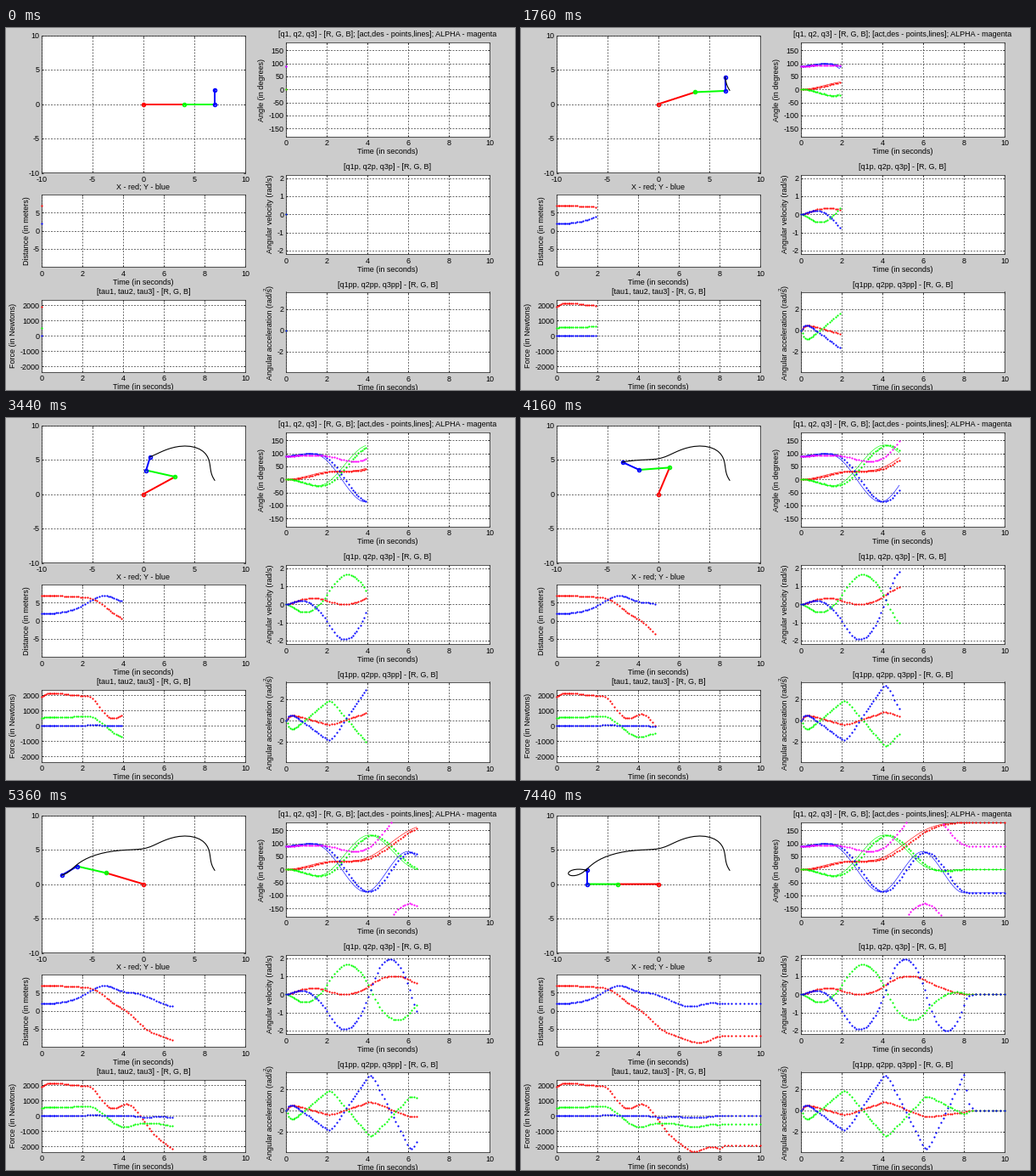
A matplotlib script for the animation above (7.52 s loop, 600x426 px).

```python
import numpy as np
import matplotlib.pyplot as plt
from matplotlib.animation import FuncAnimation

W, H, DPI = 600, 426, 100
PX = 72 / DPI  # points per pixel
plt.rcParams.update({"font.family": "Liberation Sans", "font.size": 9 * PX,
                     "lines.scale_dashes": False})
RED, GREEN, BLUE, MAGENTA = "#ff0000", "#00ff00", "#0000ff", "#ff00ff"
RGB = (RED, GREEN, BLUE)

# Arm of three uniform rods, steered through joint angles given every two seconds
LENGTHS = np.array([4, 3, 2])
MASSES = 5.05 * LENGTHS
GRAVITY = 9.81
VIA_STEP = 2
VIA_ANGLES = np.radians([[0, 29, 45, 147, 180], [0, -14, 131, 15, 0], [90, 73, -86, 68, -90]])
LAG = 0.085  # time constant of each of the controller's two delay stages
DT = 0.001
clock = np.arange(0, 10 + DT / 2, DT)


def spline_acceleration(q):
    """Acceleration at the via points of a cubic spline that starts and ends at rest."""
    n, h = len(q) - 2, VIA_STEP
    system = 4 * np.eye(n) + np.eye(n, k=1) + np.eye(n, k=-1)
    v = np.pad(np.linalg.solve(system, 3 * (q[2:] - q[:-2]) / h), 1)
    rise = 6 * np.diff(q) / h ** 2
    return np.append(rise - (4 * v[:-1] + 2 * v[1:]) / h, 2 * v[-2] / h - rise[-1])


def integrate(rate, start=0):
    return start + np.append(0, np.cumsum(rate[1:] + rate[:-1]) * DT / 2)


def delayed(signal):
    t = clock[clock < 1]
    kernel = t * np.exp(-t / LAG)
    return np.convolve(signal, kernel / kernel.sum())[:len(signal)]


via_times = VIA_STEP * np.arange(VIA_ANGLES.shape[1])
wanted_acc = [np.interp(clock, via_times, spline_acceleration(q), right=0) for q in VIA_ANGLES]
wanted = np.array([integrate(integrate(a), q[0]) for a, q in zip(wanted_acc, VIA_ANGLES)])
acc = np.array([delayed(a) for a in wanted_acc])
vel = np.array([integrate(a) for a in acc])
angle = np.array([integrate(v, q[0]) for v, q in zip(vel, VIA_ANGLES)])

# The solver's step size varies, so the samples are unevenly spaced
samples = np.interp(np.arange(89), [0, 10, 22, 33, 41, 77, 80, 88],
                    [0, .71, 1.9, 3.2, 3.92, 8, 8.4, 10])
index = np.rint(samples / DT).astype(int)
times = clock[index]
wanted, acc, vel, angle = (rows[:, index] for rows in (wanted, acc, vel, angle))
alpha = (np.degrees(angle.sum(axis=0)) + 180) % 360 - 180

# Complex numbers hold plane positions and accelerations
direction = np.exp(1j * np.cumsum(angle, axis=0))
spin, spin_rate = np.cumsum(vel, axis=0), np.cumsum(acc, axis=0)
rods = LENGTHS[:, None] * direction
rod_acc = rods * (1j * spin_rate - spin ** 2)
joints = np.vstack([0 * times, np.cumsum(rods, axis=0)])
joint_acc = np.vstack([0 * times, np.cumsum(rod_acc, axis=0)])
centers = joints[:-1] + rods / 2
forces = MASSES[:, None] * (joint_acc[:-1] + rod_acc / 2 + 1j * GRAVITY)
twist = (MASSES * LENGTHS ** 2 / 12)[:, None] * spin_rate
torque = [sum((np.conj(centers[i] - joints[j]) * forces[i]).imag + twist[i]
              for i in range(j, 3)) for j in range(3)]

fig = plt.figure(figsize=(W / DPI, H / DPI), dpi=DPI, facecolor="#cccccc")


def label(x, y, text, **style):
    fig.text(x / W, 1 - y / H, text, **{"ha": "center", "va": "baseline", **style})


def panel(left, top, right, bottom, xlim, ylim, xticks, yticks):
    ax = fig.add_axes([left / W, 1 - bottom / H, (right - left) / W, (bottom - top) / H],
                      xlim=xlim, ylim=ylim, xticks=xticks, yticks=yticks)
    ax.grid(color="#404040", lw=.75 * PX, ls=(0, (2 * PX, 1.5 * PX)))
    ax.set_axisbelow(True)
    ax.tick_params(direction="in", length=2.5 * PX, width=.7 * PX, top=True, right=True,
                   labelbottom=False, labelleft=False)
    for spine in ax.spines.values():
        spine.set(linewidth=.8 * PX, edgecolor="#303030")
    for v in xticks:
        x = left + (v - xlim[0]) / (xlim[1] - xlim[0]) * (right - left)
        label(x, bottom + 10.7, str(v))
    for v in yticks:
        y = bottom - (v - ylim[0]) / (ylim[1] - ylim[0]) * (bottom - top)
        label(left - 2.3, y + 3.3, str(v), ha="right")
    return ax


def time_panel(left, top, bottom, ylim, yticks, title, title_y, ylabel, ylabel_pos):
    ax = panel(left, top, left + 240, bottom, (0, 10), ylim, range(0, 11, 2), yticks)
    label(left + 120, title_y, title)
    label(left + 120, bottom + 20.6, "Time (in seconds)")
    label(*ylabel_pos, ylabel, rotation=90, va="center")
    return ax


arm_ax = panel(42, 8.5, 282, 170.5, (-10, 10), (-10, 10), range(-10, 11, 5), range(-10, 11, 5))
dist_ax = time_panel(42, 196, 281, (-10, 10), (-5, 0, 5), "X - red; Y - blue", 189.5,
                     "Distance (in meters)", (24.5, 239))
tau_ax = time_panel(42, 320, 404.5, (-2350, 2350), range(-2000, 2001, 1000),
                    "[tau1, tau2, tau3] - [R, G, B]", 313, "Force (in Newtons)", (8.5, 362))
angle_ax = time_panel(330, 17, 127.5, (-180, 180), range(-150, 151, 50),
                      "[q1, q2, q3] - [R, G, B]; [act,des - points,lines]; ALPHA - magenta",
                      10.5, "Angle (in degrees)", (302, 73))
vel_ax = time_panel(330, 172.5, 266, (-2.2, 2.2), range(-2, 3), "[q1p, q2p, q3p] - [R, G, B]",
                    166, "Angular velocity (rad/s)", (312, 219))
acc_ax = time_panel(330, 310.5, 405, (-3.9, 3.6), (-2, 0, 2), "[q1pp, q2pp, q3pp] - [R, G, B]",
                    305, "Angular acceleration (rad/s)", (312, 358.5))
label(306.5, 307.5, "2", rotation=90, va="center", fontsize=6 * PX)

series = []  # (line, x data, y data), revealed step by step


def reveal(ax, x, y, color, **style):
    line, = ax.plot([], [], color=color, **style)
    series.append((line, x, y))


def dots(ax, rows, colors=RGB):
    for row, color in zip(rows, colors):
        reveal(ax, times, row, color, ls="", marker="o", ms=2.2 * PX, mew=0,
               zorder=3, clip_on=False)


for row, color in zip(np.degrees(wanted), RGB):
    reveal(angle_ax, times, row, color, lw=.6 * PX)
dots(angle_ax, [*np.degrees(angle), alpha], (*RGB, MAGENTA))
dots(dist_ax, [joints[3].real, joints[3].imag], (RED, BLUE))
dots(tau_ax, torque)
dots(vel_ax, vel)
dots(acc_ax, acc)

links = [arm_ax.plot([], [], color=color, lw=2 * PX, marker="o", ms=3.8 * PX,
                     mfc="none", mew=1.7 * PX, markevery=marks)[0]
         for color, marks in zip(RGB, ([0], [0], [0, 1]))]
reveal(arm_ax, joints[3].real, joints[3].imag, "black", lw=1.1 * PX)

HOLDS = np.array([24, 25, 44, 63, 82])  # frames that repeat the one before


def draw(frame):
    step = frame - np.count_nonzero(HOLDS <= frame)
    for line, x, y in series:
        line.set_data(x[:step + 1], y[:step + 1])
    for k, link in enumerate(links):
        ends = joints[k:k + 2, step]
        link.set_data(ends.real, ends.imag)
    return []


animation = FuncAnimation(fig, draw, frames=94, interval=80, repeat=True, repeat_delay=0)
plt.show()
```
